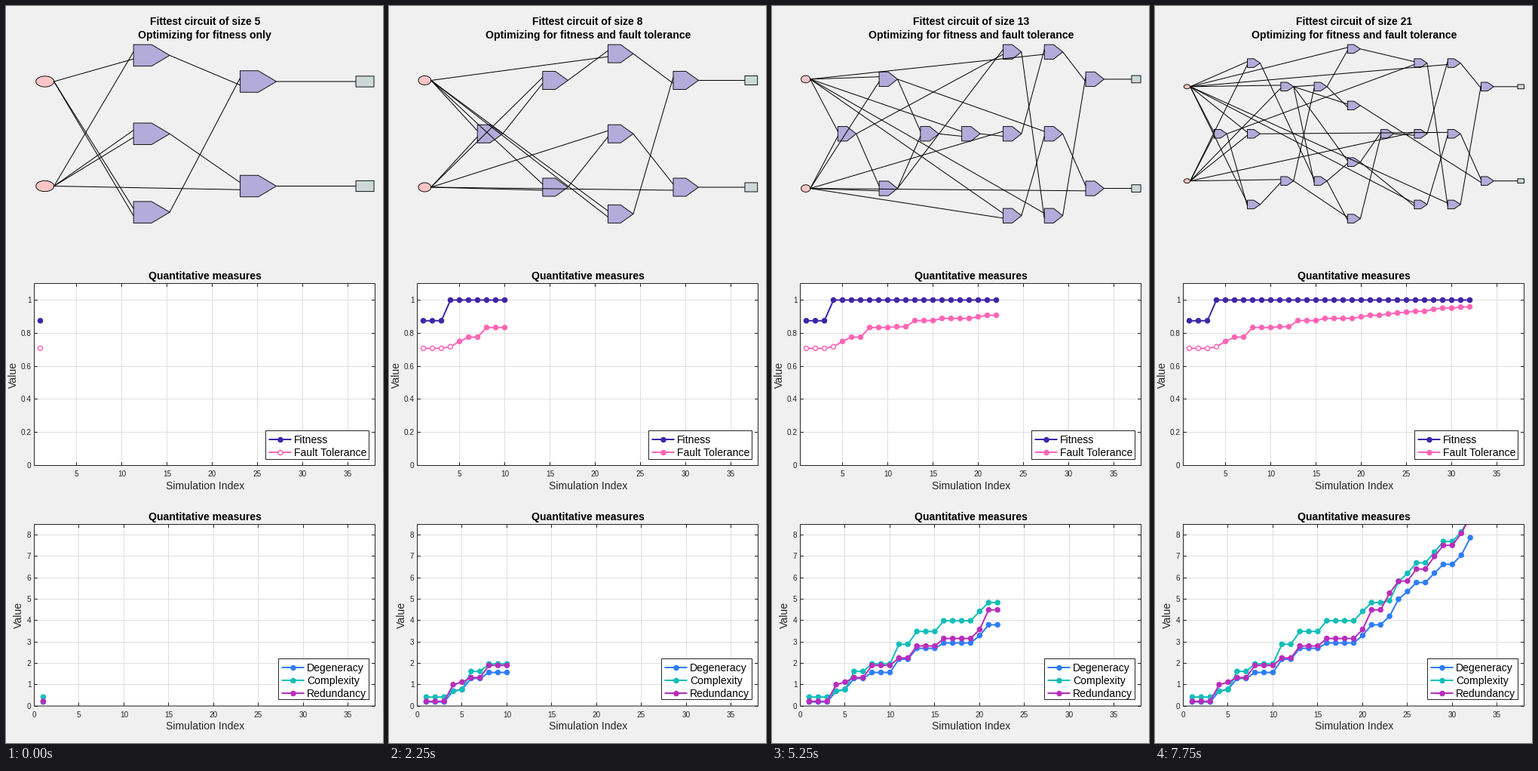
A matplotlib script that plays this animation: 500x976 px, repeating every 8 s.

```python
import matplotlib.pyplot as plt
import numpy as np
from matplotlib.animation import FuncAnimation
from matplotlib.collections import LineCollection, PolyCollection
from matplotlib.patches import Rectangle

W, H, DPI = 500, 976, 64
PT = 72 / DPI  # points per pixel
INK = "#262626"
VIOLET, PINK = "#3e26a8", "#ff66b6"
BLUE, TEAL, MAGENTA = "#2f7dfb", "#12beb9", "#b92dbb"
GATE, SOURCE, SINK = "#b3abd9", "#fac6c5", "#ccd9d8"

plt.rcParams["font.family"] = "Liberation Sans"
plt.rcParams["path.snap"] = False
fig = plt.figure(figsize=(W / DPI, H / DPI), dpi=DPI, facecolor="#f0f0f0")
ax = fig.add_axes([0, 0, 1, 1])
ax.set(xlim=(0, W), ylim=(H, 0))
ax.axis("off")

# How many simulations each best circuit lasts, and its measures
RUNS = [3, 1, 1, 2, 3, 2, 3, 4, 1, 2, 1, 1, 1, 2, 1, 2, 1, 1]
FITNESS = [0.875] + [1] * 17
TOLERANCE = [.708, .718, .75, .776, .834, .839, .876, .889, .899,
             .908, .916, .922, .927, .932, .944, .951, .957, .959]
DEGENERACY = [.19, .7, .78, 1.29, 1.57, 2.19, 2.7, 2.95, 3.3,
              3.8, 4.2, 5.0, 5.36, 5.78, 6.22, 6.63, 7.06, 7.88]
COMPLEXITY = [.42, .69, .76, 1.62, 1.97, 2.89, 3.49, 3.99, 4.43,
              4.84, 4.93, 5.82, 6.21, 6.7, 7.2, 7.7, 8.15, 8.88]
REDUNDANCY = [.22, 1.0, 1.12, 1.33, 1.9, 2.25, 2.81, 3.16, 3.58,
              4.5, 5.28, 5.84, 5.85, 6.41, 7.0, 7.52, 8.08, 8.86]
GROUP = np.repeat(np.arange(18), RUNS)
FITNESS_ONLY = 4  # simulations before fault tolerance counts too

# Columns split by "/". Each gate names its two inputs: A and B are the
# sources, lower case letters are the gates in reading order.
CIRCUITS = [
    "BA BB AA / ca bB",
    "AA BB AA / ca bB",
    "AB / AA Ba AA / db cB",
    "BA AB / aA Bb AA / ec dB",
    "AB / Ba AB / bA Bc AA / fd eB",
    "AB / Aa / Bb AB / cA Bd AA / ge fB",
    "AB BB / ab / Bc AB / dA Be AA / hf gB",
    "AB BB / ab / Ac / Bd AB / eA Bf AA / ig hB",
    "AB BB / ab / Ac / cd / Be AB / fA Bg AA / jh iB",
    "AB / AB aB / bc / Ad / ca Be AB / gA bh Af / ki jB",
    "AB / AB aB / bB Bc / dA / ea Bf AB / hA bi Ag / lj kB",
    "AB / AB aB / bB Bc / dA / df / ea Bg AB / iA bj Ah / mk lB",
    "AB / AB aB / bB Bc / dA / dA / fg / ea Bh AB / jA bk Ai / nl mB",
    "AB / AB aB / AB Bc / bd / df fe / gh / ha Bi Ag / kA al Aj / om nB",
    "AB / AB aB / AB Bc / bd / de df fe / hi / ia Bj Ah / lA am Ak / pn og",
    "AB / AB aB aB / AB Bd / be / ef eg gf / ij / ja Bk Ai / mA cn Al / qo ph",
    "AB / AB AB aB / AB Bd / ef be / eg eh fh / jk / ka Bl Aj / nA co Am"
    " / rp qi",
    "AB / AB AB Aa / AB Bd / ef be / Ag eg eh fh / kl / ia Bm Ak / oA cp An"
    " / sq rj",
]
SIZES = [5, 6, 8, 11, 16, 19, 21]
GATE_W = [48, 41, 33.5, 27, 20.5, 18.5, 17]
GATE_H = [28.5, 27, 24, 20.5, 17.5, 15, 11.5]
MID_Y, SPAN_Y = 169.25, 236.25


def text(x, y, s, size=14, **kw):
    kw = {"ha": "center", "va": "baseline", "color": INK, **kw}
    return ax.text(x, y, s, fontsize=size * PT, **kw)


def title(y, s):
    return text(263.7, y, s, weight="bold", color="black")


def stroke(xs, ys, color=INK, width=1, **kw):
    return ax.plot(xs, ys, color=color, lw=width * PT,
                   solid_capstyle="butt", **kw)[0]


def crisp(v):
    return np.floor(v) + 0.5


def gate_shape(x, y, w, h):
    return [(x - w / 2, y - h / 2), (x, y - h / 2), (x + w / 2, y),
            (x, y + h / 2), (x - w / 2, y + h / 2)]


def ellipse(x, y, w, h):
    t = np.linspace(0, 2 * np.pi, 40)
    return np.column_stack([x + w / 2 * np.cos(t), y + h / 2 * np.sin(t)])


def block(x, y, w, h):
    return [(x - w / 2, y - h / 2), (x + w / 2, y - h / 2),
            (x + w / 2, y + h / 2), (x - w / 2, y + h / 2)]


def dots(points, color, zorder):
    return ax.add_collection(PolyCollection(
        [ellipse(x, y, 6, 6) for x, y in points], facecolors=color,
        edgecolors=color, linewidths=1.5 * PT, zorder=zorder))


class Chart:
    LEFT, RIGHT = 37.5, 489.5

    def __init__(self, top, bottom, xmin, ymax, xticks, yticks, label_x):
        self.bottom, self.xmin = bottom, xmin
        self.kx = (self.RIGHT - self.LEFT) / (38 - xmin)
        self.ky = (bottom - top) / ymax
        left, right = self.LEFT, self.RIGHT
        box = dict(xy=(left, top), width=right - left, height=bottom - top)
        ax.add_patch(Rectangle(**box, fc="white", ec="none", zorder=0))
        self.frame = ax.add_patch(
            Rectangle(**box, fill=False, ec=INK, lw=PT, zorder=3))
        for v in xticks:
            x = crisp(self.x(v) + 0.01)
            stroke([x, x], [top, bottom], "#dfdfdf", zorder=1)
            stroke([x, x], [top, top + 4.5], zorder=3)
            stroke([x, x], [bottom - 4.5, bottom], zorder=3)
            text(x, bottom + 14.5, f"{v:g}", 10)
        for v in yticks:
            y = crisp(self.y(v))
            stroke([left, right], [y, y], "#dfdfdf", zorder=1)
            stroke([left, left + 4.5], [y, y], zorder=3)
            stroke([right - 4.5, right], [y, y], zorder=3)
            text(33.5, y + 3.6, f"{v:g}", 10, ha="right")
        title(top - 5.5, "Quantitative measures")
        text(263.7, bottom + 31.5, "Simulation Index")
        text(label_x, (top + bottom) / 2, "Value", rotation=90, va="center")

    def x(self, v):
        return self.LEFT + (np.asarray(v) - self.xmin) * self.kx

    def y(self, v):
        return self.bottom - np.asarray(v) * self.ky

    def add(self, color, values, hollow=0):
        """Return a function that shows the first n points."""
        xs, ys = self.x(np.arange(1, 33)), self.y(np.asarray(values)[GROUP])
        line = stroke([], [], color, 2, zorder=4)
        marks = dots([], color, 4)
        marks.set_facecolor(["white"] * hollow + [color] * (32 - hollow))
        line.set_clip_path(self.frame)
        marks.set_clip_path(self.frame)
        discs = [ellipse(x, y, 6, 6) for x, y in zip(xs, ys)]

        def show(n):
            line.set_data(xs[:n], ys[:n])
            marks.set_verts(discs[:n])
        return show


def legend(left, top, bottom, entries):
    ax.add_patch(Rectangle((left, top), 481.5 - left, bottom - top,
                           fc="white", ec=INK, lw=PT, zorder=5))
    keys = []
    for i, (name, color) in enumerate(entries):
        y = top + 11.5 + 17 * i
        stroke([left + 4, left + 34], [y, y], color, 2, zorder=6)
        keys.append(dots([(left + 19, y)], color, 7))
        text(left + 37.5, y + 5, name, ha="left", color="black", zorder=6)
    return keys


upper = Chart(367.5, 608.5, 1 / 3, 1.1, range(5, 36, 5),
              np.arange(0, 1.1, 0.2), 9.5)
lower = Chart(686.5, 927, 0, 8.5, range(0, 36, 5), range(9), 16.5)
shows = [
    upper.add(VIOLET, FITNESS),
    upper.add(PINK, TOLERANCE, FITNESS_ONLY),
    lower.add(BLUE, DEGENERACY),
    lower.add(TEAL, COMPLEXITY),
    lower.add(MAGENTA, REDUNDANCY),
]
pink_key = legend(344.5, 562.5, 600.5,
                  [("Fitness", VIOLET), ("Fault Tolerance", PINK)])[1]
legend(361.5, 864.5, 918.5, [("Degeneracy", BLUE), ("Complexity", TEAL),
                             ("Redundancy", MAGENTA)])

size_title = title(25, "")
goal_title = title(43, "")
shapes = ax.add_collection(
    PolyCollection([], edgecolors="black", linewidths=0.9 * PT, zorder=2))
wires = ax.add_collection(
    LineCollection([], colors="black", linewidths=PT, zorder=3))


def layout(netlist):
    """Return gate count, polygons, their colours and the wires."""
    columns = [c.split() for c in netlist.split("/")]
    count = sum(map(len, columns))
    w, h = np.interp(count, SIZES, GATE_W), np.interp(count, SIZES, GATE_H)
    most = max(map(len, columns))
    height = (SPAN_Y - h) * (most + 1) / (most - 1)
    first, last = 37.5 + 0.295 * w, 490.2 - 0.295 * w
    xs = np.linspace(first, last, len(columns) + 2)

    def rows(n):
        return MID_Y + height * (np.arange(1, n + 1) / (n + 1) - 0.5)

    polys, colors, segments, tips = [], [], [], {}
    for name, y in zip("AB", rows(2)):
        tips[name] = (first + w / 4, y)
        polys.append(ellipse(first, y, w / 2, h / 2))
        colors.append(SOURCE)
    names = iter("abcdefghijklmnopqrstuvwxyz")
    for x, column in zip(xs[1:], columns):
        for y, inputs in zip(rows(len(column)), column):
            tip = (x + w / 2, y)
            tips[next(names)] = tip
            polys.append(gate_shape(x, y, w, h))
            colors.append(GATE)
            for source, port in zip(inputs, (-h / 6, h / 6)):
                segments.append([tips[source], (x - w / 2, y + port)])
            if column is columns[-1]:
                polys.append(block(last, y, w / 2, h / 2))
                colors.append(SINK)
                segments.append([tip, (last - w / 4, y)])
    return count, polys, colors, segments


layouts = [layout(c) for c in CIRCUITS]


def draw(i):
    n = i + 1
    count, polys, colors, segments = layouts[GROUP[i]]
    shapes.set_verts(polys)
    shapes.set_facecolor(colors)
    wires.set_segments(segments)
    size_title.set_text(f"Fittest circuit of size {count}")
    early = n <= FITNESS_ONLY
    goal = "fitness only" if early else "fitness and fault tolerance"
    goal_title.set_text(f"Optimizing for {goal}")
    for show in shows:
        show(n)
    pink_key.set_facecolor("white" if early else PINK)


anim = FuncAnimation(fig, draw, frames=32, interval=250, repeat=True,
                     repeat_delay=0, init_func=lambda: draw(0))
plt.show()
```
